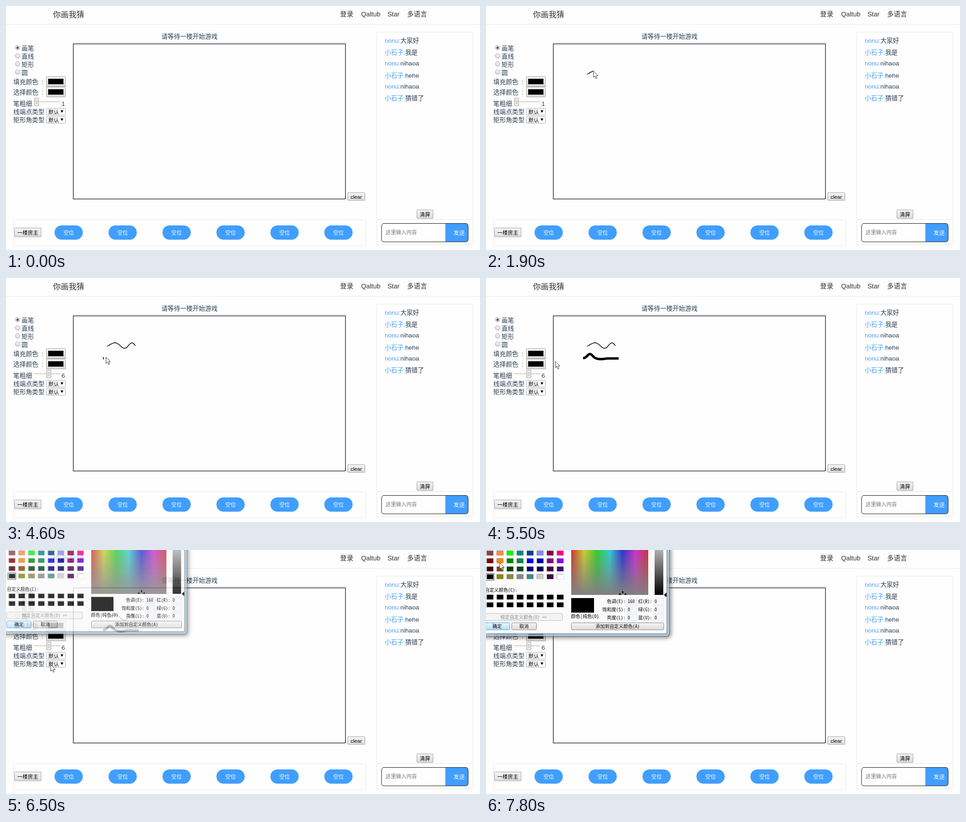
An HTML page for the animation above (8 s loop, 1040 by 538 pixels).

```html
<!DOCTYPE html>
<html lang="zh-CN">
<head>
<meta charset="utf-8">
<title>你画我猜</title>
<style>
html, body { margin: 0; width: 100%; height: 100%; overflow: hidden; background: #fefefe; }
svg { display: block; width: 1040px; height: 538px; }
text { font-family: 'Liberation Sans', 'Noto Sans CJK SC', 'Noto Sans CJK', sans-serif; white-space: pre; }
#dialog text { font-family: 'Noto Sans Mono CJK SC', 'Noto Sans CJK SC', 'Liberation Mono', monospace; }
#glass { filter: drop-shadow(3px 3px 5px rgba(0, 0, 0, .7)); }
</style>
</head>
<body>
<svg id="stage" viewBox="0 0 1040 538" xmlns="http://www.w3.org/2000/svg">
  <defs>
    <linearGradient id="btn" x2="0" y2="1"><stop stop-color="#f6f6f6"/><stop offset="1" stop-color="#dcdcdc"/></linearGradient>
    <linearGradient id="hot" x2="0" y2="1"><stop stop-color="#eaf6fd"/><stop offset="1" stop-color="#b5dff5"/></linearGradient>
    <linearGradient id="hue"></linearGradient>
    <linearGradient id="fade" x2="0" y2="1"><stop stop-color="#808080" stop-opacity=".4"/><stop offset="1" stop-color="#808080"/></linearGradient>
    <linearGradient id="lum" x2="0" y2="1"><stop stop-color="#b0b0b0"/><stop offset="1" stop-color="#000"/></linearGradient>
  </defs>
  <g id="page"></g>
  <g fill="none" stroke="#000" stroke-linejoin="round">
    <polyline id="thin" stroke-width="1.5"/>
    <polyline id="thick" stroke-width="5.3"/>
  </g>
  <g id="dialog"></g>
  <path id="cursor" d="M0 0V14.2L3.3 11.2 5.6 16.6 7.9 15.6 5.6 10.4H10Z" fill="#fff" stroke="#222" stroke-width=".9" stroke-linejoin="round"/>
</svg>
<script>
const $ = id => document.getElementById(id);
const INK = '#2c3e50', BLUE = '#409eff';
const clamp = k => Math.min(1, Math.max(0, k));
const mix = (a, b, k) => a + (b - a) * k;

const rect = (x, y, w, h, fill = 'none', stroke = 'none', rx = 0, extra = '') =>
  `<rect x="${x}" y="${y}" width="${w}" height="${h}" fill="${fill}" stroke="${stroke}" rx="${rx}" ${extra}/>`;
const line = (d, color, w = 1) => `<path d="${d}" fill="none" stroke="${color}" stroke-width="${w}"/>`;
// cy is the middle of the glyphs
const text = (x, cy, s, size = 13.7, fill = INK, anchor = 'start') =>
  `<text x="${x}" y="${cy + size * .37}" font-size="${size}" fill="${fill}" text-anchor="${anchor}">${s}</text>`;
const button = (x, y, w, h, s) =>
  rect(x, y, w, h, 'url(#btn)', '#a0a0a0', 1) + text(x + w / 2, y + h / 2 + .6, s, 11.5, '#000', 'middle');

function radio(cy, label, on) {
  const dot = on ? `<circle cx="25.5" cy="${cy}" r="2.6" fill="#555"/>` : '';
  return `<circle cx="25.5" cy="${cy}" r="5" fill="url(#btn)" stroke="#a0a0a0"/>` + dot + text(34, cy + 1, label);
}

const colorField = (y, label) =>
  text(16, y + 11.5, label + '  :') + rect(88.5, y, 42, 22, 'url(#btn)', '#a0a0a0', 1) +
  rect(92.5, y + 5, 33.5, 12, '#000', '#777');

const select = (y, label) =>
  text(16, y + 7.5, label) + rect(88.5, y, 42, 15, '#fff', '#a9a9a9', 1) +
  text(93, y + 8.5, '默认', 11.5, '#000') + `<path d="M119.5 ${y + 4.5}h6.4l-3.2 5.5z"/>`;

function buildPage() {
  const chat = ['nonu:大家好', '小石子:我是', 'nonu:nihaoa', '小石子:hehe', 'nonu:nihaoa', '小石子:猜错了'];
  let s = line('M0 40.5H1040', '#e8e8e8') + text(103, 18.5, '你画我猜', 17.2, '#333');
  s += text(733, 18, '登录', 14.6, '#333') + text(779, 18, 'Qaltub', 14.4, '#333') +
    text(837, 18, 'Star', 14.4, '#333') + text(880, 18, '多语言', 14.6, '#333');
  s += text(402.5, 67, '请等待一楼开始游戏', 13.7, INK, 'middle');
  s += rect(147.6, 83.5, 597.2, 342, '#fefefe', '#000', 0, 'stroke-width="1.2"') + button(749.5, 411.5, 38, 17, 'clear');

  s += ['画笔', '直线', '矩形', '圆'].map((w, i) => radio(92 + 17.9 * i, w, i === 0)).join('');
  s += colorField(155.5, '填充颜色') + colorField(178.5, '选择颜色');
  s += text(16, 215, '笔粗细') + rect(62, 209.5, 58, 3, '#e2dad6', 'none', 1);
  s += `<g id="thumb">${rect(-4.5, 203, 9, 17, '#f1eeec', '#a39b95', 1)}${line('M-2 208.5H2M-2 211.5H2M-2 214.5H2', '#a39b95')}</g>`;
  s += `<text id="size" x="121.8" y="220" font-size="13.7" fill="${INK}"></text>`;
  s += select(225.5, '线端点类型') + select(243.5, '矩形角类型');

  s += rect(16.5, 471.5, 772.5, 57, 'none', '#e6e6e6') + button(18.5, 489.5, 58.5, 19.5, '一楼房主');
  for (let i = 0; i < 6; i++) {
    const x = 106.5 + 118.4 * i;
    s += rect(x, 483.7, 62, 31.6, BLUE, 'none', 15.8) + text(x + 31, 499.5, '空位', 11.5, '#fff', 'middle');
  }

  s += rect(813.5, 57.5, 211, 469, 'none', '#e4e7ed', 4) + line('M814 470.5H1024', '#e4e7ed');
  s += chat.map((row, i) => {
    const [who, msg] = row.split(':');
    return text(831, 76 + 25.2 * i + i % 2, `<tspan fill="${BLUE}">${who}:</tspan>${msg}`);
  }).join('');
  s += button(901.5, 449.5, 35.5, 19, '清屏');
  s += `<path d="M964 480H1009Q1014 480 1014 485V515Q1014 520 1009 520H964Z" fill="${BLUE}"/>`;
  s += rect(824, 479.5, 190, 40.5, 'none', '#111', 5);
  s += text(833, 498.5, '这里输入内容', 11.4, '#757575') + text(982, 500, '发送', 12.2, '#fff');
  $('page').innerHTML = s;
}

function swatch(cx, cy, color, dim = 1) {
  const x = Math.round(cx - 7), y = Math.round(cy - 5);
  return rect(x, y, 14, 10, color, 'none', 0, `style="filter:brightness(${dim})"`) +
    line(`M${x - .5} ${y + 10}V${y - .5}H${x + 14}`, '#999') +
    line(`M${x} ${y + 10.5}H${x + 14.5}V${y}`, '#e3e3e3');
}

function buildDialog() {
  const vivid = '800 f80 080 084 00f 00a 808 80f';
  const palette = ['844 f84 0f0 088 048 88f 804 f08', vivid, vivid, '000 880 884 888 488 ccc 404 fff'];
  const label = (x, y, s, anchor, fill = '#000') => text(x, y, s, 10.2, fill, anchor);
  const push = (x, y, w, s, fill = 'url(#btn)', edge = '#808080', ink = '#000') =>
    rect(x, y, w, 15.5, fill, edge, 2) + label(x + w / 2, y + 8, s, 'middle', ink);
  const field = (x, y, v) => rect(x, y - 7.5, 22, 15, '#f3f6fb', '#dfe4ec') + label(x + 2, y, v);

  // translucent frame around an opaque panel
  let s = rect(-60, -200, 462, 390, 'rgba(176,208,238,.65)', '#333', 6, 'id="glass"');
  s += rect(-59, -199, 460, 388, 'none', '#e4f1fb', 5);
  s += rect(-54, -190, 450.5, 374, '#fbfbfb', '#8497a8');

  palette.forEach((row, r) => row.split(' ').forEach((c, i) =>
    s += swatch(8.5 + 22.1 * i, 7.2 + 17.2 * r, '#' + c, r === 2 ? .5 : 1)));
  for (let i = 0; i < 16; i++) s += swatch(8.5 + 22.1 * (i % 8), i < 8 ? 104 : 121, '#000');
  s += rect(-.5, 51.5, 18, 15, 'none', '#333');

  s += label(-2.5, 88, '自定义颜色(C):');
  s += push(-3, 140, 170.5, '规定自定义颜色(D) &gt;&gt;', '#f4f4f4', '#b8bcc0', '#8a8a8a');
  s += push(-3, 160.5, 55, '确定', 'url(#hot)', '#3c9fd8') + push(56.5, 160.5, 54, '取消');
  s += push(187.5, 160.5, 202.5, '添加到自定义颜色(A)');

  s += rect(187, -60, 169, 159, 'url(#hue)') + rect(187, 0, 169, 99, 'url(#fade)');
  s += line('M292 97.5H296M304 97.5H308M300 91V95', '#000', 3);
  s += rect(370, 0, 19, 99, 'url(#lum)') + '<path d="M390.5 99L396 94V104Z"/>';
  s += rect(187, 106, 50, 32, '#000') + label(186.5, 146.5, '颜色|纯色(O)');

  ['色调(E): 红(R):', '饱和度(S): 绿(G):', '亮度(L): 蓝(U):'].forEach((pair, i) => {
    const [left, right] = pair.split(' '), y = 113.5 + 17.8 * i;
    s += label(306, y, left, 'end') + field(309, y, i ? '0' : '160') + label(334, y, right) + field(368, y, '0');
  });
  $('dialog').innerHTML = s;
  $('hue').innerHTML = [0, 1, 2, 3, 4, 5, 6].map(i =>
    `<stop offset="${i / 6}" stop-color="hsl(${i * 60},100%,50%)"/>`).join('');
}

const bell = (x, mid, width) => Math.exp(-(((x - mid) / width) ** 2));

// Each stroke is a curve y(x); the ink follows the hand after a lag
const strokes = [
  { id: 'thin', from: 1500, to: 2350, lag: 0, x0: 222, x1: 284,
    y(x) { const d = x - 239; return 149 - 6.2 * Math.cos((7.2 * d + .065 * d * d) * Math.PI / 180); } },
  { id: 'thick', from: 4400, to: 5100, lag: 100, x0: 213, x1: 291,
    y: x => 177.3 - 10 * bell(x, 228, 8) + 1.6 * bell(x, 252, 10) }
];
const reach = (s, t) => mix(s.x0, s.x1, clamp((t - s.from) / (s.to - s.from)) ** 2);

function inkPoints(s, t) {
  const end = reach(s, t - s.lag), pts = [];
  for (let x = s.x0; x < end; x += 3) pts.push(x + ',' + s.y(x));
  if (pts.length) pts.push(end + ',' + s.y(end));
  return pts.join(' ');
}

// Where the hand rests between strokes
const stop = (arrive, leave, x, y) => ({ arrive, leave, x, y });
const stops = [
  stop(100, 100, 1030, 48), stop(320, 900, 254, 164), stop(1300, 1300, 218, 174), stop(1500, 1500, 222, 152),
  stop(2350, 2400, 284, 150), stop(2900, 3400, 68, 213), stop(3700, 3900, 95, 213), stop(4300, 4400, 213, 175),
  stop(5100, 5200, 290, 177), stop(5800, 6300, 106, 186), stop(6500, 6500, 98, 253), stop(6700, 6900, 102, 304),
  stop(7700, 8000, 30, 28)
];

function hand(t) {
  const s = strokes.find(s => t >= s.from && t < s.to);
  if (s) {
    const x = reach(s, t);
    return [x, s.y(x)];
  }
  const i = Math.max(1, stops.findIndex(p => t <= p.leave));
  const a = stops[i - 1], b = stops[i];
  const k = clamp((t - a.leave) / (b.arrive - a.leave));
  const eased = 1 - (1 - k) ** 2;
  return [mix(a.x, b.x, eased), mix(a.y, b.y, eased)];
}

function render(t) {
  const [x, y] = hand(t);
  $('cursor').setAttribute('transform', `translate(${x} ${y})`);
  $('cursor').setAttribute('visibility', t < 100 ? 'hidden' : 'visible');
  strokes.forEach(s => $(s.id).setAttribute('points', inkPoints(s, t)));

  const size = 1 + Math.round(5 * clamp((t - 3400) / 300));
  $('thumb').setAttribute('transform', `translate(${67 + (size - 1) * 5.4} 0)`);
  $('size').textContent = size;

  // The dialog grows and fades in over three ticks
  const open = clamp((t - 6300) / 250);
  const scale = mix(.88, 1, open);
  $('dialog').setAttribute('opacity', open);
  $('dialog').setAttribute('visibility', open ? 'visible' : 'hidden');
  $('dialog').setAttribute('transform', `translate(${187 * (1 - scale)} 0) scale(${scale})`);
}

buildPage();
buildDialog();
const start = performance.now();
// The picture changes ten times a second
function frame() {
  const t = (performance.now() - start) % 8000;
  render(Math.floor(t / 100) * 100);
  requestAnimationFrame(frame);
}
frame();
</script>
</body>
</html>
```
